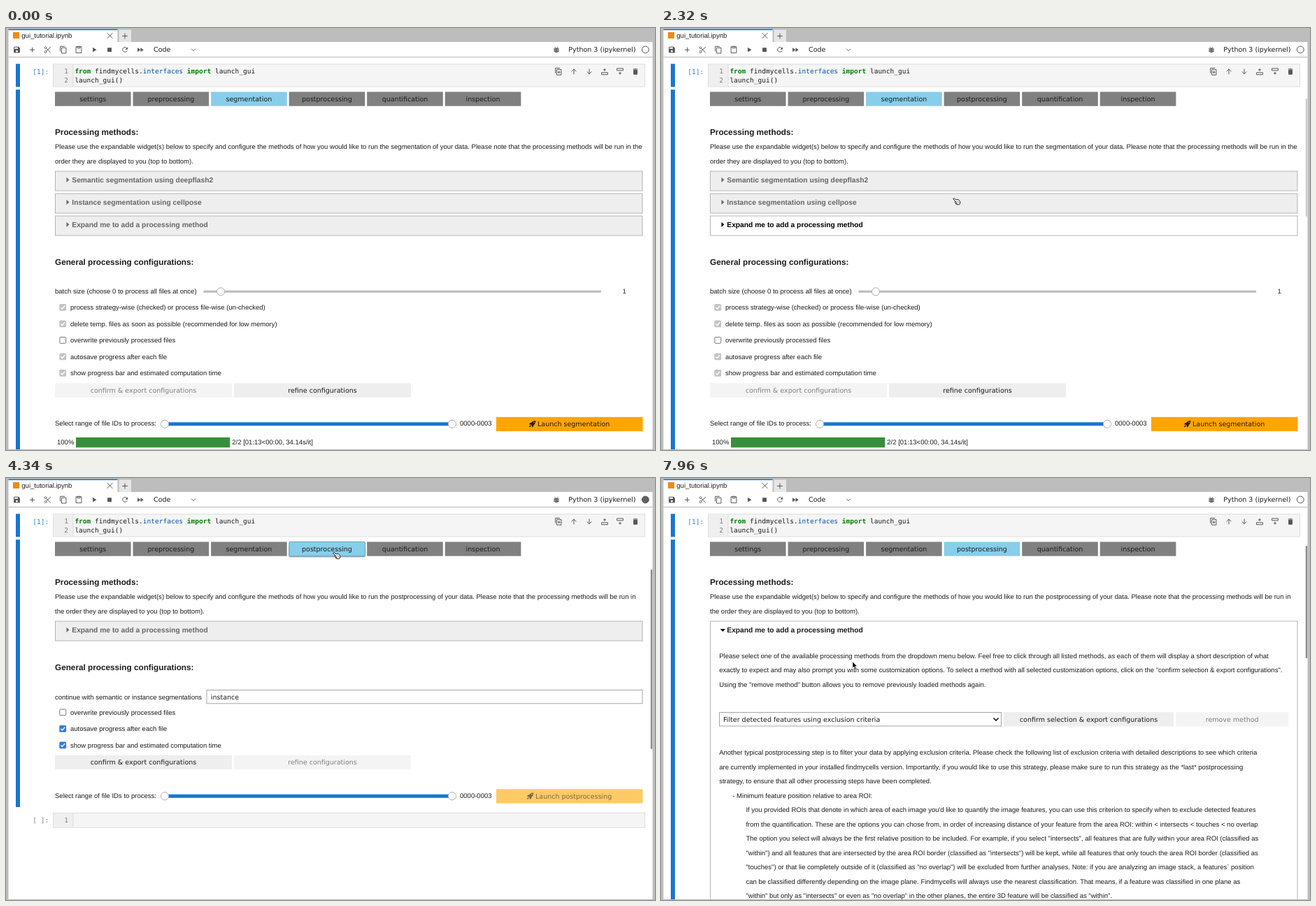
Write an HTML page that moves like this. It is 928 by 604 pixels and loops after 8 s.

```html
<!DOCTYPE html>
<html lang="en">
<head>
<meta charset="utf-8">
<title>Notebook GUI walkthrough</title>
<style>
html, body { margin: 0; width: 100%; height: 100%; overflow: hidden; background: #fff; }
svg { display: block; width: 928px; height: 604px; }
text { font: 9.53px "Liberation Sans", Arial, sans-serif; fill: #1c1c1c; white-space: pre; text-rendering: geometricPrecision; }
.ui { font-family: "DejaVu Sans", sans-serif; }
.mono { font-family: "DejaVu Sans Mono", monospace; }
.head { font-size: 11.75px; font-weight: bold; }
.title { font-size: 10.28px; font-weight: bold; }
.kw { font-weight: bold; fill: #008000; }
.mid { text-anchor: middle; }
.dim { fill: #808080; }
.acc rect { fill: #eee; stroke: #b5b5b5; }
.acc text, .acc path { fill: #666; }
.acc.hot rect { fill: #fff; }
.acc.hot text, .acc.hot path { fill: #000; }
.ico { fill: #555; }
.line { fill: none; stroke: #555; stroke-width: 2; }
</style>
</head>
<body>
<svg id="stage" viewBox="0 0 928 604" xmlns="http://www.w3.org/2000/svg"></svg>
<script>
const LOOP = 8000;
const esc = s => s.replace(/&/g, '&amp;').replace(/</g, '&lt;');
const text = (x, y, s, cls = '') => `<text x="${x}" y="${y}" class="${cls}">${esc(s)}</text>`;
const rect = (x, y, w, h, fill, more = '') =>
  `<rect x="${x}" y="${y}" width="${w}" height="${h}" fill="${fill}" ${more}/>`;
const group = (id, body, more = '') => `<g id="${id}" ${more}>${body}</g>`;
const lines = (x, y, rows) => rows.map((s, i) => text(x, y + i * 20.53, s)).join('');

// Icons live in a 24 unit box centred on (x, y).
const icon = (x, y, d, cls = 'ico', scale = .489) =>
  `<path class="${cls}" fill-rule="evenodd" d="${d}" transform="translate(${x} ${y}) scale(${scale}) translate(-12 -12)"/>`;

const button = (x, y, w, label, off) =>
  rect(x, y, w, 20.4, off ? '#f4f4f4' : '#eee') +
  text(x + w / 2, y + 13.6, label, 'ui mid' + (off ? ' dim' : ''));

const accordion = (id, y, label) => group(id,
  rect(70.5, y + .5, 839.5, 28, '') + `<path d="M86.5 ${y + 9.2}l3.8 3.6-3.8 3.6z"/>` +
  text(94.3, y + 16.5, label, 'title'), 'class="acc"');

function check(y, label, color) {
  const box = color
    ? rect(76.3, y - 4.8, 9.8, 9.8, color, 'rx="1.5"') +
      `<path d="M78.4 ${y + .2}l2 2 3.8-4.4" fill="none" stroke="#fff" stroke-width="1.4"/>`
    : rect(76.9, y - 4.3, 8.8, 8.8, '#fff', 'rx="1" stroke="#777"');
  return box + text(92, y + 3.4, label);
}

const knob = (x, y) => `<circle cx="${x}" cy="${y}" r="5.6" fill="#fff" stroke="#a8a8a8" stroke-width=".9"/>`;
const chevron = (x, y) =>
  `<path d="M${x - 3.6} ${y - 1.8}l3.6 3.6 3.6-3.6" fill="none" stroke="#111" stroke-width="1.6"/>`;

const rocket = (x, y) => `<path transform="translate(${x} ${y})" fill-rule="evenodd"
  d="M9.3 0C6 0 4.5 1.3 3.2 3L1.2 3.2 0 5.6 2.2 5.5 4 7.3 3.8 9.5 6.2 8.3 6.5 6.2C8.2 4.9 9.4 3.3 9.3 0ZM7.8 2.4a.8 .8 0 1 1-1.6 0a.8 .8 0 1 1 1.6 0ZM2 6.6C.6 7 .3 8 .1 9.3 1.5 9.1 2.5 8.8 2.9 7.5Z"/>`;

// File range slider with the launch button; y is the slider centre.
const launch = (y, label, iconX, off) =>
  text(70, y + 2.3, 'Select range of file IDs to process:') +
  rect(227, y - 2.5, 411, 5, '#1976d2') + knob(227, y) + knob(638, y) +
  text(649, y + 2.3, '0000-0003') +
  rect(701, y - 10, 209.5, 20.3, off ? '#ffc966' : '#ffa500') +
  `<g fill="${off ? '#79674a' : '#1c1c1c'}">${rocket(iconX, y - 4.8)}</g>` +
  `<g ${off ? 'opacity=".55"' : ''}>${text(iconX + 12, y + 3.6, label, 'ui')}</g>`;

const configButtons = (y, done) =>
  button(70, y, 253, 'confirm & export configurations', done) +
  button(326, y, 253, 'refine configurations', !done);

const intro = (first, second) =>
  text(70, 152.6, 'Processing methods:', 'head') + lines(70, 173, [first, second]);

const ask = 'Please use the expandable widget(s) below to specify and configure the methods of how you would like to run the ';
const GREY = '#c4c4c4', BLUE = '#2f7de1';
const OVERWRITE = 'overwrite previously processed files';
const AUTOSAVE = 'autosave progress after each file';
const PROGRESS = 'show progress bar and estimated computation time';

function chrome() {
  const cut = 'M6 2.9a3.1 3.1 0 1 0 .01 0M6 14.9a3.1 3.1 0 1 0 .01 0M8.2 8.2L21 20.5M8.2 15.8L21 3.5';
  const copy = 'M3 17V2h13M7 6h13v16H7z';
  const paste = 'M4 3h16v18H4zM8 2h8v5H8z';
  const up = 'M12 20V5M5 12l7-7 7 7', down = 'M12 4v15M5 12l7 7 7-7';
  const tools = [
    [15.5, 'M17 3H5Q3 3 3 5v14q0 2 2 2h14q2 0 2-2V7zM12 13a3 3 0 1 1-.01 0M5 5h10v4H5z'],
    [37.5, 'M5 11h6V5h2v6h6v2h-6v6h-2v-6H5z'],
    [59.5, cut, 'line'], [82, copy, 'line'], [104, paste, 'line'],
    [126, 'M8 5v14l11-7z'], [148, 'M6 6h12v12H6z'],
    [170, 'M17.5 6.8A7 7 0 1 0 18.8 14', 'line'], [170, 'M13 11h7V4z'],
    [192, 'M4 18l8.5-6L4 6zM13 6v12l8.5-6z'],
    [268, 'M6 9l6 6 6-6', 'line'],
    [787, 'M8 8h8v10q-4 4-8 0zM4 9h16M4 13h16M4 17h16M7 3.5l3 3M17 3.5l-3 3M10 11h4M10 15h4', 'line']
  ];
  const cellTools = [
    [790, copy + 'M13.5 10v8M9.5 14h8'], [812, up], [834, down],
    [856, 'M3 15h18v6H3zM12 3v8M8 7h8'], [878, 'M3 3h18v6H3zM12 13v8M8 17h8']
  ];
  return rect(0, 0, 928, 604, '#bdbdbd') + rect(3.5, 20, 921, 583, '#fff') +
    rect(3.5, 2, 156, 18, '#fff') + rect(3.5, 1.5, 156, 1.6, '#1976d2') +
    rect(10, 6, 9, 9, '#ef8b13') + text(22.3, 13.6, 'gui_tutorial.ipynb') +
    icon(148.5, 11, 'M4 4l16 16M20 4L4 20', 'line') +
    rect(161.5, 2.5, 17.5, 17.5, '#e6e6e6') + icon(170, 11.5, 'M12 4v16M4 12h16', 'line') +
    rect(3.5, 41, 921, 1, '#c2c2c2') + rect(3.5, 42, 921, 1, '#eee') +
    tools.map(([x, d, c]) => icon(x, 31.2, d, c)).join('') +
    text(211, 34.3, 'Code', 'ui') + text(804.3, 34.3, 'Python 3 (ipykernel)', 'ui') +
    '<circle id="kernel" cx="914.3" cy="31" r="4.9" fill="#fff" stroke="#555"/>' +
    rect(14, 51.3, 6, 33, '#1976d2') + text(38.3, 65.6, '[1]:', 'mono" style="fill:#307fc1') +
    cell(51.8, 32.2) + text(83.2, 65, '1', 'mono dim') + text(83.2, 77.5, '2', 'mono dim') +
    `<text x="98.4" y="65" class="mono"><tspan class="kw">from</tspan> findmycells.<tspan fill="#05a">interfaces</tspan> <tspan class="kw">import</tspan> launch_gui</text>` +
    text(98.4, 77.5, 'launch_gui()', 'mono') +
    cellTools.map(([x, d]) => icon(x, 62.3, d, 'line')).join('') +
    icon(900, 62.3, 'M6 7h12v12q0 2-2 2H8q-2 0-2-2zM5 4h4l1-1h4l1 1h4v2H5z');
}

function cell(y, h) {
  return rect(67.5, y, 846, h, '#f5f5f5', 'stroke="#dedede"') +
    rect(68, y + .5, 28, h - 1, '#efefef') + rect(95.5, y, 1, h, '#ddd');
}

function tabs() {
  const names = ['settings', 'preprocessing', 'segmentation', 'postprocessing', 'quantification', 'inspection'];
  const shadow = group('hover', rect(404.2, 97, 110, 16.5, '#000', 'rx="2" opacity=".3"'));
  return shadow + names.map((s, i) => {
    const x = 70 + i * 111.55;
    return rect(x, 91.4, 108.6, 20.3, '#808080', `id="tab${i}"`) + text(x + 54.3, 105.1, s, 'ui mid');
  }).join('') + rect(404.8, 91.3, 108.8, 20.6, 'none', 'id="focus" rx="2" stroke="#5c9fc0"');
}

const segPage = () =>
  intro(ask + 'segmentation of your data. Please note that the processing methods will be run in the',
    'order they are displayed to you (top to bottom).') +
  accordion('semantic', 204.5, 'Semantic segmentation using deepflash2') +
  accordion('inst', 236.5, 'Instance segmentation using cellpose') +
  accordion('add', 268.5, 'Expand me to add a processing method') +
  text(70, 338.8, 'General processing configurations:', 'head') +
  text(70, 380, 'batch size (choose 0 to process all files at once)') +
  rect(282.5, 375.6, 568.5, 3.2, '#bdbdbd') + knob(307, 377.3) + text(881.5, 380, '1') +
  check(399.8, 'process strategy-wise (checked) or process file-wise (un-checked)', GREY) +
  check(423.3, 'delete temp. files as soon as possible (recommended for low memory)', GREY) +
  check(446.8, OVERWRITE) + check(470.3, AUTOSAVE, GREY) + check(493.8, PROGRESS, GREY) +
  configButtons(508.4, true) + launch(566.8, 'Launch segmentation', 748, false) +
  text(73, 596.3, '100%') + rect(100, 586, 220.3, 14.4, '#388e3c') +
  text(323.3, 596.3, '2/2 [01:13<00:00, 34.14s/it]');

const postPage = () =>
  accordion('addPost', 204.5, 'Expand me to add a processing method') +
  text(70, 274.8, 'General processing configurations:', 'head') +
  text(70, 316.5, 'continue with semantic or instance segmentations') +
  rect(287, 303.5, 623, 19.3, '#fff', 'stroke="#a5a5a5"') + text(292.8, 316.8, 'instance', 'ui') +
  group('drop', chevron(902.8, 313.3)) +
  check(335.3, OVERWRITE) + check(358.8, AUTOSAVE, BLUE) + check(382.3, PROGRESS, BLUE) +
  configButtons(396.7, false) + launch(455.3, 'Launch postprocessing', 745, true) +
  text(38.3, 493.3, '[ ]:', 'mono dim') + cell(479.3, 21) + text(83.2, 493.3, '1', 'mono dim');

const expandedPage = () =>
  rect(70.5, 205, 839.5, 420, '#fff', 'stroke="#b5b5b5"') +
  '<path d="M84.6 216h7.4l-3.7 4z"/>' + text(94.3, 221, 'Expand me to add a processing method', 'title') +
  lines(83.2, 257.8, [
    'Please select one of the available processing methods from the dropdown menu below. Feel free to click through all listed methods, as each of them will display a short description of what',
    'exactly to expect and may also prompt you with some customization options. To select a method with all selected customization options, click on the "confirm selection & export configurations".',
    'Using the "remove method" button allows you to remove previously loaded methods again.'
  ]) +
  rect(83.5, 335.5, 403, 19.5, '#fff', 'stroke="#a5a5a5"') +
  text(89, 348.8, 'Filter detected features using exclusion criteria', 'ui') + chevron(479, 345.3) +
  button(490, 335.2, 243, 'confirm selection & export configurations') +
  button(736, 335.2, 161.3, 'remove method', true) +
  lines(83.2, 396.2, [
    'Another typical postprocessing step is to filter your data by applying exclusion criteria. Please check the following list of exclusion criteria with detailed descriptions to see which criteria',
    'are currently implemented in your installed findmycells version. Importantly, if you would like to use this strategy, please make sure to run this strategy as the *last* postprocessing',
    'strategy, to ensure that all other processing steps have been completed.'
  ]) +
  text(102.3, 457.8, '- Minimum feature position relative to area ROI:') +
  lines(121.4, 478.3, [
    'If you provided ROIs that denote in which area of each image you\'d like to quantify the image features, you can use this criterion to specify when to exclude detected features',
    'from the quantification. These are the options you can chose from, in order of increasing distance of your feature from the area ROI: within < intersects < touches < no overlap',
    'The option you select will always be the first relative position to be included. For example, if you select "intersects", all features that are fully within your area ROI (classified as',
    '"within") and all features that are intersected by the area ROI border (classified as "intersects") will be kept, while all features that only touch the area ROI border (classified as',
    '"touches") or that lie completely outside of it (classified as "no overlap") will be excluded from further analyses. Note: if you are analyzing an image stack, a features` position',
    'can be classified differently depending on the image plane. Findmycells will always use the nearest classification. That means, if a feature was classified in one plane as',
    '"within" but only as "intersects" or even as "no overlap" in the other planes, the entire 3D feature will be classified as "within".'
  ]);

const pointers =
  group('arrow', '<path d="M0 0V9L2.1 7.1 3.5 10.2 5 9.5 3.6 6.5H6.4Z" fill="#000" stroke="#fff" stroke-width=".5"/>') +
  group('hand', '<path d="M.6 1.4L2 .6 5 2.8 8.2 2.4 11 6 10.2 9 8 10 4.5 8.8 5 7.6 3 6.6 4 5.2Z" fill="#fff" stroke="#111" stroke-width=".9" stroke-linejoin="round"/><path d="M4 5.2l2 1.2M5 7.6l2 .6M7 4.6l2 2" stroke="#111" stroke-width=".8"/>');

const postIntro = intro(ask + 'postprocessing of your data. Please note that the processing methods will be run in',
  'the order they are displayed to you (top to bottom).');

const stage = document.getElementById('stage');
stage.innerHTML = chrome() + rect(14, 88.2, 6, 515, '#1976d2', 'id="bar"') + tabs() +
  group('seg', segPage()) + group('intro', postIntro) + group('post', postPage()) +
  group('expanded', expandedPage()) + rect(0, 603, 928, 1, '#bdbdbd') +
  rect(921.8, 0, 2.4, 0, '#ccc', 'id="scroll" rx="1"') + pointers;

const el = {};
stage.querySelectorAll('[id]').forEach(e => el[e.id] = e);

// Pointer stops: time, x, y.
const path = [
  [500, 598, 2], [600, 594, 18], [700, 589, 47], [800, 583, 110], [910, 572, 190],
  [1010, 560, 245], [1110, 548, 281], [1210, 537, 301],
  [1310, 528, 325], [1410, 515, 345], [1510, 500, 360], [1610, 480, 367],
  [1720, 465, 366], [1820, 450, 360], [1920, 440, 353], [2020, 433, 345],
  [2120, 426, 325], [2220, 420, 284], [2320, 417, 243], [2420, 454, 186],
  [2520, 467, 153], [2620, 470, 130], [2730, 471, 117], [2840, 471, 111],
  [2940, 470, 103], [3040, 469, 98], [3140, 468, 102], [3240, 467, 106],
  [5250, 460, 111], [5350, 435, 125], [5450, 395, 143], [5550, 345, 161],
  [5650, 290, 178], [5750, 235, 193], [5850, 190, 206], [5950, 155, 216],
  [6050, 136, 219], [6150, 137, 220],
  [7560, 150, 222], [7660, 185, 233], [7760, 225, 247], [7860, 258, 258], [7960, 274, 263]
];
const handTimes = [[1010, 1310], [2220, 2420], [2940, 5350], [5950, 7660]];

const within = (t, a, b) => t >= a && t < b;
const show = (e, on) => e.style.display = on ? '' : 'none';
const hot = (e, on) => e.classList.toggle('hot', on);

function draw(t) {
  const seg = t < 4140, open = t >= 6870, post = !seg && !open;
  show(el.seg, seg);
  show(el.intro, !seg);
  show(el.post, post);
  show(el.expanded, open);
  show(el.drop, t >= 4440);
  show(el.hover, within(t, 2940, 5350));
  show(el.focus, within(t, 4040, 6870));
  el.tab2.setAttribute('fill', seg ? '#87ceeb' : '#808080');
  el.tab3.setAttribute('fill', seg ? '#808080' : '#87ceeb');
  el.kernel.setAttribute('fill', within(t, 4040, 4440) ? '#616161' : '#fff');
  el.bar.setAttribute('height', post ? 382.8 : 514.8);

  hot(el.inst, within(t, 1110, 1210) || within(t, 2420, 2520));
  hot(el.add, within(t, 1210, 1310) || within(t, 2320, 2420));
  hot(el.addPost, t >= 5950);

  const [top, bottom] = seg ? [101, 270] : post ? [131, 388] : [97, 258];
  show(el.scroll, t >= 800);
  el.scroll.setAttribute('y', top);
  el.scroll.setAttribute('height', bottom - top);
  el.scroll.setAttribute('fill', seg ? '#ccc' : '#8c8c8c');

  const at = path.filter(p => p[0] <= t).pop();
  const isHand = handTimes.some(([a, b]) => within(t, a, b));
  show(el.hand, at && isHand);
  show(el.arrow, at && !isHand);
  if (at) (isHand ? el.hand : el.arrow).setAttribute('transform', `translate(${at[1]} ${at[2]})`);
}

const start = performance.now();
function tick() {
  draw((performance.now() - start) % LOOP);
  requestAnimationFrame(tick);
}
tick();
</script>
</body>
</html>
```
